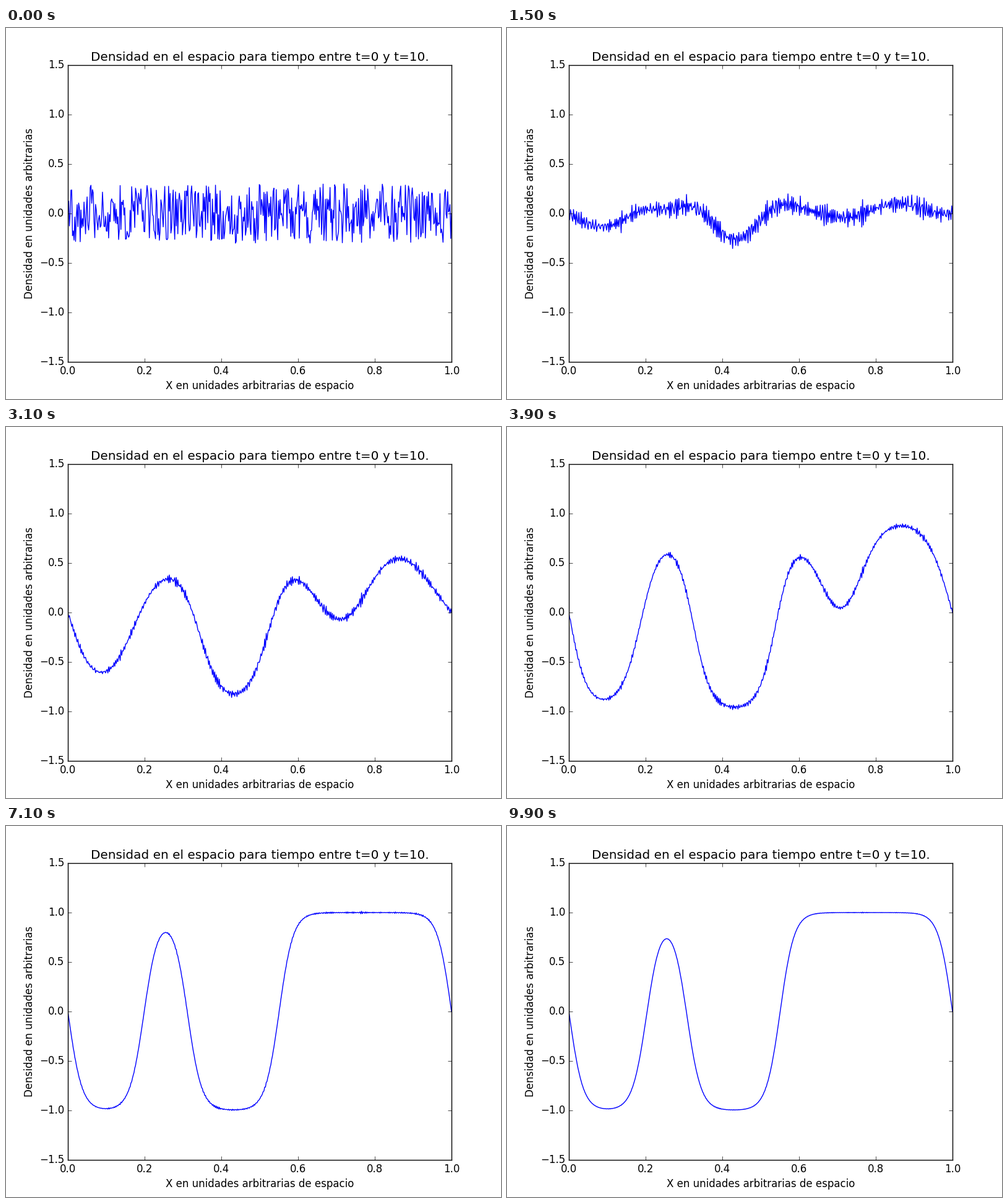
A matplotlib script for the animation above (10 s loop, 800 px wide and 600 px high).

```python
import numpy as np
import matplotlib.pyplot as plt
from matplotlib.animation import FuncAnimation

GAMMA, MU = 0.001, 1.5   # diffusion and reaction strength
NX, NT = 500, 100        # points in space and time
DT = 0.1


def solve():
    """n_t = GAMMA n_xx + MU (n - n^3): Crank-Nicolson plus Euler reaction."""
    h = 1 / (NX - 1)
    r = GAMMA * DT / (2 * h ** 2)

    np.random.seed(3)
    n = np.random.uniform(low=-0.3, high=0.3, size=NX)
    n[0] = n[-1] = 0

    m = NX - 2
    lap = np.eye(m, k=1) + np.eye(m, k=-1) - 2 * np.eye(m)
    inverse = np.linalg.inv(np.eye(m) - r * lap)
    explicit = np.eye(m) + r * lap

    history = [n]
    for _ in range(NT - 1):
        inner = n[1:-1]
        rhs = explicit @ inner + DT * MU * (inner - inner ** 3)
        n = np.zeros(NX)
        n[1:-1] = inverse @ rhs
        history.append(n)
    return history


plt.style.use("classic")
plt.rcParams["font.family"] = "DejaVu Sans"

x = np.linspace(0, 1, NX)
density = solve()

fig = plt.figure(figsize=(8, 6), dpi=100, facecolor="white")
ax = fig.add_axes([0.125, 0.1, 0.775, 0.8])
ax.set_xlim(0, 1)
ax.set_ylim(-1.5, 1.5)
ax.set_title("Densidad en el espacio para tiempo entre t=0 y t=10.")
ax.set_xlabel("X en unidades arbitrarias de espacio")
ax.set_ylabel("Densidad en unidades arbitrarias")
line, = ax.plot(x, density[0], color="#0000ff", lw=1)


def update(i):
    line.set_ydata(density[i])
    return line,


anim = FuncAnimation(fig, update, frames=NT, interval=100,
                     repeat=True, repeat_delay=0, blit=False)
plt.show()
```
